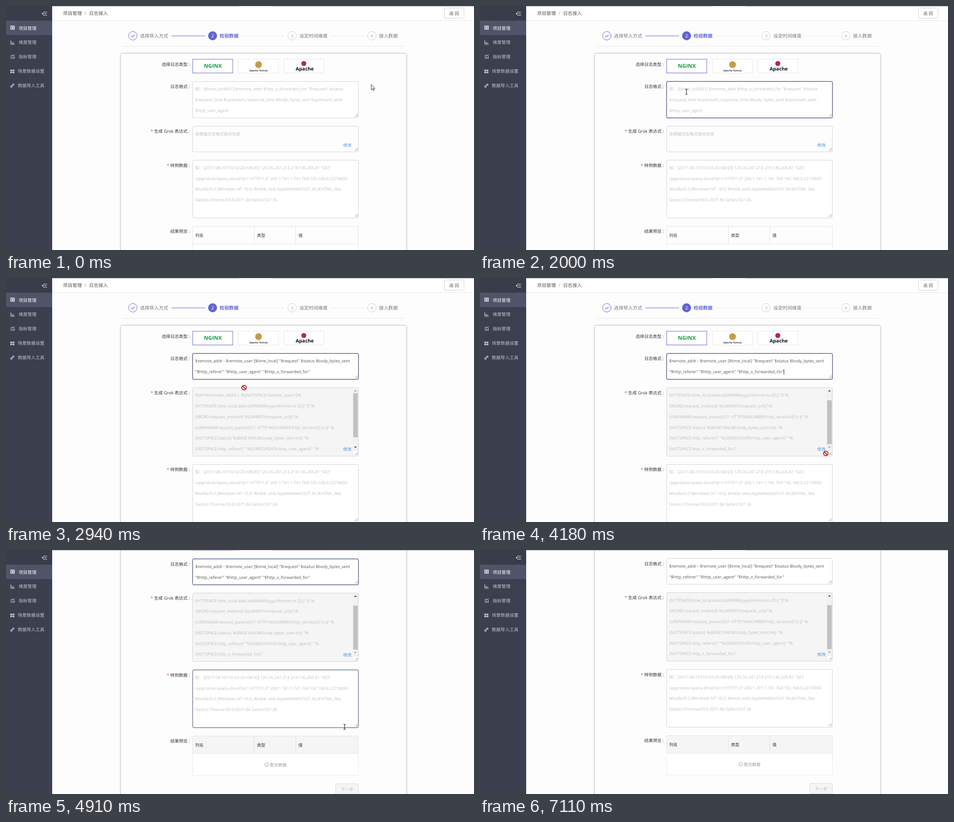
Recreate the animation shown at these times as an HTML page. Size 1034x541 px, loop 8 s.

```html
<!DOCTYPE html>
<html lang="zh-CN">
<head>
<meta charset="utf-8">
<title>日志接入</title>
<style>
html, body { margin: 0; width: 100%; height: 100%; overflow: hidden; background: #fdfdfd; }
svg { display: block; }
text {
  font-family: "Open Sans", "Noto Sans CJK SC", "Noto Sans CJK", sans-serif;
  text-rendering: geometricPrecision;
  white-space: pre;
}
</style>
</head>
<body>
<svg id="stage" width="1034" height="541" viewBox="0 0 1034 541"></svg>
<script>
const LOOP = 8000;
const LINE = 23.75;
const PURPLE = '#6164d3';
const stage = document.getElementById('stage');
const $ = id => document.getElementById(id);

// ---- markup helpers ----
const rect = (x, y, w, h, fill, more = '') =>
  `<rect x="${x}" y="${y}" width="${w}" height="${h}" fill="${fill}" ${more}/>`;
const path = (d, stroke, more = '') => `<path d="${d}" stroke="${stroke}" fill="none" ${more}/>`;
const text = (x, middle, str, fill, size = 9.12, more = '') =>
  `<text x="${x}" y="${middle + size * 0.36}" fill="${fill}" font-size="${size}" ${more}>${str}</text>`;
const lines = (x, middle, rows, fill) =>
  rows.map((row, i) => text(x, middle + i * LINE, row, fill)).join('');
const label = (middle, str, required) =>
  text(406, middle, `${required ? '<tspan fill="#f04134">* </tspan>' : ''}${str} :`, '#333', 9.5,
    'text-anchor="end" font-weight="500"');
const centered = 'text-anchor="middle"';

// ---- text ----
const formatHint = [
  '如：[$time_iso8601] $remote_addr $http_x_forwarded_for "$request" $status',
  '$request_time $upstream_response_time $body_bytes_sent $upstream_addr',
  '$http_user_agent'];
const formatValue = [
  '$remote_addr - $remote_user [$time_local] "$request" $status $body_bytes_sent',
  '"$http_referer" "$http_user_agent" "$http_x_forwarded_for"'];
const grokValue = [
  '%{IPV4:remote_addr} \\- %{NOTSPACE:remote_user} \\[%',
  '{HTTPDATE:time_local:date;dd/MMM/yyyy:HH:mm:ss Z}\\] "(?:%',
  '{WORD:request_method} %{URIPATH:request_url}(?:%',
  '{URIPARAM:request_param})?(?: HTTP/%{NUMBER:http_version})?|(-))" %',
  '{NOTSPACE:status} %{BASE16NUM:body_bytes_sent:int} "%',
  '{NOTSPACE:http_referer}" "%{GREEDYDATA:http_user_agent}" "%',
  '{NOTSPACE:http_x_forwarded_for}"'];
const sampleHint = [
  '如：[2017-08-10T16:53:20+08:00] 120.76.247.214 219.136.205.81 "GET',
  '/app/slices/query-druid?q=1 HTTP/1.0" 200 1.741 1.741 764 192.168.0.227:8000',
  'Mozilla/5.0 (Windows NT 10.0; Win64; x64) AppleWebKit/537.36 (KHTML, like',
  'Gecko) Chrome/59.0.3071.86 Safari/537.36'];

// ---- parts ----
function sidebar() {
  const items = ['项目管理', '维度管理', '指标管理', '场景数据设置', '数据导入工具'];
  const icons = [
    path('M10.5 44.5h8v7h-8z', '#fff', 'stroke-width="1.3"') + rect(12.5, 46.5, 4, 3, '#fff'),
    path('M10.5 76v9h9M13 84v-5M15.2 84v-3.5M17.4 84v-2.5', '#c3c5ce', 'stroke-width="1.2"'),
    path('M11 117v-3M13.5 117v-5M16 117v-3.5M18.5 117v-6M10 112l3-3 2.5 1.5 3.5-3', '#c3c5ce', 'stroke-width="1.2"'),
    [[9.5, 141], [14.5, 141], [9.5, 145.5], [14.5, 145.5]].map(([x, y]) => rect(x, y, 4, 3.5, '#c3c5ce')).join(''),
    path('M12.5 178.5l3.5-4', '#c3c5ce', 'stroke-width="1.3"') +
      '<g fill="none" stroke="#c3c5ce" stroke-width="1.3"><circle cx="11.8" cy="178.8" r="1.8"/><circle cx="16.2" cy="174.4" r="1.8"/></g>'];
  return rect(0, 0, 102, 541, '#3c3f4d') + rect(0, 0, 102, 32.5, '#393c49') + rect(0, 32.5, 102, 32, '#515369') +
    path('M82 13.5h8.5M84 17h6.5M82 20.5h8.5', '#e4e5ea', 'stroke-width="1.2"') +
    '<path d="M78.5 17l4-2.3v4.6z" fill="#e4e5ea"/>' +
    items.map((name, i) => icons[i] +
      text(i < 3 ? 28 : 26, 49 + i * 31.9, name, i ? '#c3c5ce' : '#fff', 9.8)).join('');
}

function header() {
  return rect(102, 0, 932, 32, '#fff') + path('M102 32.5h932', '#e6e6e6') +
    text(126, 16.5, '项目管理<tspan fill="#999" dx="6">/</tspan><tspan dx="6">日志接入</tspan>', '#555', 10.4) +
    rect(968.5, 4.5, 43.5, 22.5, '#fff', 'rx="2.5" stroke="#d0d0d0"') +
    text(990.3, 16.3, '返 回', '#555', 9.5, centered);
}

function steps() {
  const ring = (x, stroke, fill, mark) =>
    `<circle cx="${x}" cy="66" r="9.4" fill="${fill}" stroke="${stroke}"/>` + mark;
  const num = (x, n, fill) => text(x, 66, n, fill, 10.4, centered);
  return ring(280.2, PURPLE, '#fff', path('M276.5 66l2.7 2.7 4.8-5', PURPLE, 'stroke-width="1.2"')) +
    text(296, 66.5, '选择导入方式', '#777', 10.4) + path('M365.5 66.3h74.5', PURPLE) +
    ring(456.4, PURPLE, PURPLE, num(456.4, 2, '#fff')) +
    text(472, 66.5, '检验数据', PURPLE, 10.4, 'font-weight="700"') + path('M521 66.5h95', '#e9e9e9') +
    ring(632.2, '#ccc', '#fff', num(632.2, 3, '#b0b0b0')) +
    text(648, 66.5, '设定时间维度', '#777', 10.4) + path('M717 66.5h75', '#e9e9e9') +
    ring(808.3, '#ccc', '#fff', num(808.3, 4, '#b0b0b0')) +
    text(824, 66.5, '接入数据', '#777', 10.4) + path('M258 89.5h622', '#e6e6e6');
}

function logTypes() {
  const tile = (x, stroke) => rect(x, 118, 88.5, 30.5, '#fff', `stroke="${stroke}"`);
  const bold = centered + ' font-weight="700"';
  return label(130, '选择日志类型') +
    tile(412.5, PURPLE) + text(457, 133, 'NGINX', '#159a3e', 11.8, bold) +
    tile(513.3, '#e6e6e6') + '<circle cx="558" cy="130" r="7.5" fill="#c79a45"/>' +
    text(558, 143, 'Apache Tomcat', '#333', 5.3, bold) +
    tile(614, '#e6e6e6') + '<circle cx="658" cy="127.5" r="5.5" fill="#bd2446"/>' +
    text(660, 139.3, 'Apache', '#111', 10.8, bold);
}

function field(id, inner) {
  const frame = (part, more) => rect(412.5, 0.5, 366, 10, 'none', `id="${id}${part}" rx="2.5" ${more}`);
  return `<g id="${id}">${frame('Glow', 'stroke="#5b64c8" stroke-opacity=".28" stroke-width="3.5"')}
    ${frame('Box', 'style="fill:#fff" stroke="#d2d2d2"')}${inner}
    ${frame('Edge', 'stroke="#3f4766"')}
    <g id="${id}Grip">${path('M771 -2l6-6M774.5 -2l2.5-2.5', '#777', 'stroke-width=".9"')}</g></g>`;
}

function grokBody() {
  return label(12, '生成 Grok 表达式', true) +
    `<g id="grokHint">${text(418, 17.5, '会根据日志格式自动生成', '#bfbfbf', 9)}</g>
    <g id="grokValue">
      <svg id="grokView" x="413" y="1" width="353" height="10"><g id="grokText">${lines(5, 16.5, grokValue, '#bdbdbd')}</g></svg>
      <rect id="grokTrack" x="766" y="1" width="12" height="10" fill="#f1f1f1"/>
      <rect id="grokThumb" x="767" width="10" height="97.5" fill="#c1c1c1"/>
      <path id="grokUp" d="M769 9l3-3.2 3 3.2z"/>
      <g id="grokEnd"><path id="grokDown" d="M769 -20.8l3 3.2 3-3.2z"/>
      ${rect(766, -12, 12, 11.5, '#fff', 'stroke="#e6e6e6" stroke-width=".8"')}</g>
    </g>
    <g id="grokLink">${text(745, -14.5, '修改', '#4a8fd6', 9.3)}</g>`;
}

function results() {
  return label(12, '结果预览') +
    rect(412.5, 0.5, 366, 87.5, '#fff', 'rx="2.5" stroke="#e9e9e9"') +
    rect(412.5, 0.5, 366, 39, '#fdfdfd', 'id="tableHead" stroke="#e4e4e4"') +
    path('M548.7 0.5v39M640.2 0.5v39', '#e0e0e0') +
    text(418, 20.5, '列名', '#333', 9.3) + text(554.5, 20.5, '类型', '#333', 9.3) + text(646, 20.5, '值', '#333', 9.3) +
    '<circle cx="576" cy="64" r="4.3" fill="none" stroke="#999" stroke-width=".9"/>' +
    path('M574 65.2q2 2.2 4 0M574.4 62.2v1M577.6 62.2v1', '#999', 'stroke-width=".8"') +
    text(583, 64.3, '暂无数据', '#999', 9.2) +
    rect(728.5, 106.5, 50, 23, '#f5f5f5', 'rx="2.5" stroke="#d9d9d9"') +
    text(753.5, 118.5, '下一步', '#bbb', 9.3, centered);
}

stage.innerHTML = `
  ${rect(0, 0, 1034, 541, '#fdfdfd')}
  <g id="page">${header()}${steps()}
    ${rect(254, 106, 630, 700, '#fdfdfd', 'rx="2" style="filter:drop-shadow(0 0 2px #999)"')}
    ${logTypes()}
    ${field('format', label(12, '日志格式') +
      `<g id="formatHint">${lines(418, 17.2, formatHint, '#bfbfbf')}</g>
       <g id="formatValue">${lines(418, 17.2, formatValue, '#555')}</g>
       <rect id="formatCaret" width="1" height="12" fill="#222"/>`)}
    ${field('grok', grokBody())}
    ${field('sample', label(12, '样例数据', true) + lines(418, 17.2, sampleHint, '#bfbfbf') +
      '<rect id="sampleCaret" x="418" y="11.5" width="1" height="12" fill="#222"/>')}
    <g id="results">${results()}</g>
  </g>
  ${path('M102 .7h932', '#c4c4c4', 'stroke-width="1.4"')}${path('M514 .5h74', '#f6f6f6', 'stroke-width="1"')}
  ${sidebar()}
  <path id="arrow" d="M0 0V12L2.8 9.5 4.6 13.6 6.3 12.9 4.6 8.9H8.3Z" fill="#fff" stroke="#111" stroke-width=".9"/>
  <path id="beam" d="M-2.5-5.5H2.5M0-5.5V5.5M-2.5 5.5H2.5" stroke="#111" stroke-width="1.1"/>
  <g id="denied" fill="#fff" stroke="#c9161d" stroke-width="2"><circle r="5"/><path d="M-3.5-3.5L3.5 3.5"/></g>`;

// ---- stepped tracks: [time, ...values] ----
const pointer = [
  [0, 'arrow', 807, 174], [530, 'arrow', 797, 176],
  [670, 'beam', 700, 184], [790, 'beam', 560, 186], [920, 'beam', 490, 188], [1040, 'beam', 456, 190],
  [2820, 'beam', 475, 212], [2940, 'denied', 526, 243], [3060, 'denied', 522, 279],
  [3210, 'denied', 590, 312], [3330, 'denied', 677, 349], [3480, 'denied', 766, 382], [3630, 'denied', 764, 389],
  [4330, 'beam', 766, 390], [4790, 'beam', 760, 391], [4910, 'beam', 748, 392],
  [5040, 'beam', 681, 370], [5190, 'beam', 641, 362],
  [5460, 'beam', 740, 362], [5580, 'arrow', 842, 360], [5730, 'none', 0, 0]];
const heights = [[0, 80.5, 57], [2120, 70, 95], [2270, 59, 142], [2400, 57, 152]];
const pageScroll = [[0, 0], [4330, 40], [4490, 74], [4790, 110], [4910, 147.6], [5040, 148.6]];
const grokScroll = [[0, 0], [4030, 0.5], [4180, 1]];
const formatFocus = [[0, 0], [1460, 0.5], [1610, 1], [5340, 0.5], [5460, 0.15], [5580, 0]];
const formatHover = [[0, 0], [670, 0.5], [790, 1], [2940, 0]];
const sampleFocus = [[0, 0], [5340, 0.5], [5460, 1], [6840, 0.6], [6960, 0.2], [7110, 0]];
const sampleHover = [[0, 0], [4640, 1], [5580, 0]];
const formatCaret = [[0, 0], [1460, 1], [2000, 0], [2120, 1], [2690, 0], [3210, 1], [3760, 0],
  [4180, 1], [4640, 0], [5190, 1], [5340, 0]];
const sampleCaret = [[0, 0], [5340, 1], [5860, 0], [6280, 1], [6840, 0]];
const at = (track, t) => track.findLast(row => row[0] <= t).slice(1);

const set = (id, name, value) => $(id).setAttribute(name, value);
const show = (id, on) => set(id, 'opacity', +on);
const move = (id, x, y) => set(id, 'transform', `translate(${x} ${y})`);

function place(id, top, height, focus, hover) {
  move(id, 0, top);
  for (const part of ['Box', 'Edge', 'Glow']) set(id + part, 'height', height);
  move(id + 'Grip', 0, height);
  show(id + 'Glow', 0);
  set(id + 'Glow', 'opacity', focus);
  set(id + 'Edge', 'opacity', Math.max(focus, hover));
}

function render(t) {
  const [formatH, grokH] = at(heights, t);
  const [scrolled] = at(grokScroll, t);
  const pasted = t >= 2120;
  const grokTop = 167 + formatH + 18.5;
  const sampleTop = grokTop + grokH + 18.5;

  move('page', 0, -at(pageScroll, t)[0]);
  place('format', 167, formatH, at(formatFocus, t)[0], at(formatHover, t)[0]);
  place('grok', grokTop, grokH, 0, 0);
  place('sample', sampleTop, 128, at(sampleFocus, t)[0], at(sampleHover, t)[0]);
  move('results', 0, sampleTop + 146.5);

  show('formatHint', !pasted);
  show('formatValue', pasted);
  set('formatCaret', 'x', pasted ? 671 : 418);
  set('formatCaret', 'y', pasted ? 35 : 11.5);
  show('formatCaret', at(formatCaret, t)[0]);
  show('sampleCaret', at(sampleCaret, t)[0]);

  const pale = t >= 4330 && t < 4790;
  $('grokBox').style.fill = pasted && !pale ? '#f5f5f5' : '#fdfdfd';
  set('tableHead', 'fill', t < 4790 ? '#fdfdfd' : '#f5f5f5');
  show('grokHint', !pasted);
  show('grokValue', pasted);
  set('grokView', 'height', grokH - 1);
  move('grokText', 0, -LINE * scrolled);
  set('grokTrack', 'height', grokH - 1);
  set('grokThumb', 'height', Math.max(20, grokH - 54.5));
  set('grokThumb', 'y', 13 + 15.5 * scrolled);
  set('grokUp', 'fill', scrolled ? '#444' : '#a3a3a3');
  set('grokDown', 'fill', scrolled < 1 ? '#444' : '#a3a3a3');
  move('grokEnd', 0, grokH);
  move('grokLink', 0, grokH);

  const [kind, x, y] = at(pointer, t);
  for (const id of ['arrow', 'beam', 'denied']) {
    show(id, id === kind);
    move(id, x, y);
  }
}

const start = performance.now();
function tick() {
  render((performance.now() - start) % LOOP);
  requestAnimationFrame(tick);
}
render(0);
requestAnimationFrame(tick);
</script>
</body>
</html>
```
